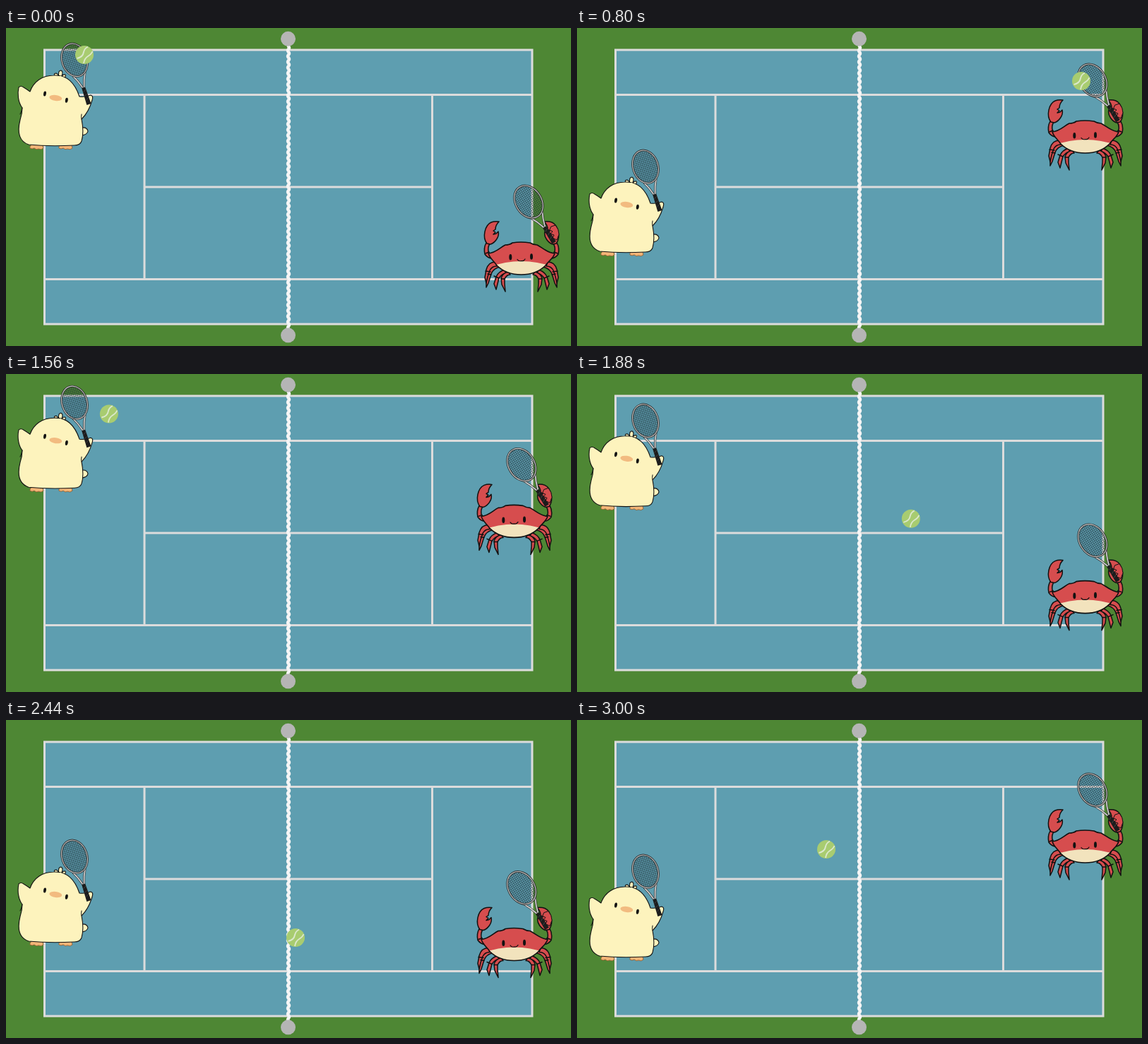
Animation of 800 by 450 pixels, one loop 3.04 s. Source, as an HTML page:

```html
<!DOCTYPE html>
<html lang="en">
<head>
<meta charset="utf-8">
<title>Tennis rally</title>
<style>
  html, body { margin: 0; width: 100%; height: 100%; overflow: hidden; background: #4e8734; }
  svg { display: block; width: 800px; height: 450px; }
  .ink { stroke: #111; stroke-linecap: round; stroke-linejoin: round; }
</style>
</head>
<body>
<svg viewBox="0 0 800 450">
  <defs>
    <clipPath id="head"><ellipse rx="18" ry="24"/></clipPath>
    <path id="shell" d="M683 319C694 318 699 311 707 307Q713 307 717 304Q729 302 742 304Q747 307 752 307C760 311 766 318 777 319C775 326 768 330 764 336C755 345 743 349 729.500 349C716 349 704 345 695 336C691 330 685 326 683 319Z"/>
    <clipPath id="shellClip"><use href="#shell"/></clipPath>

    <g id="racket">
      <path id="strings" clip-path="url(#head)" stroke="#23343b" stroke-width=".7" opacity=".75"/>
      <g fill="none">
        <path d="M-9 21Q-4 30-1 41M9 21Q4 30 1 41" stroke="#333" stroke-width="3"/>
        <path d="M-9 21Q-4 30-1 41M9 21Q4 30 1 41" stroke="#d5d5d5" stroke-width="1.600"/>
        <ellipse rx="17.800" ry="23.800" stroke="#2b2b2b" stroke-width="2.800"/>
        <ellipse rx="17.800" ry="23.800" stroke="#c9c9c9" stroke-width="1.100"/>
      </g>
      <path d="M-2.600 41H2.600L3.200 66H-3.200Z" fill="#1c1c1c"/>
      <path d="M-2 47L2 45M-2 53L2 51M-2 59L2 57" stroke="#4a4a4a" stroke-width=".7"/>
    </g>

    <g id="side" class="ink" fill="#d64d4e" stroke-width="1.500">
      <path d="M700 338Q690 340 687 348L683 361L680 367L680 358L682 346Q688 334 698 334Z"/>
      <path d="M693 331Q683 331 680 342L678 353L680 361L682 352L685 343Q688 337 695 337Z"/>
      <path d="M706 342Q697 345 694 352L691 362L694 370L696 362L698 354Q702 348 708 347Z"/>
      <path d="M711 345Q703 347 701 354L702 363L707 373L706 362L706 355Q709 349 714 349Z"/>
      <path d="M679 344L686 345M691 351L698 354M701 355L706 355M682 348L687 349" fill="none"/>
      <path d="M680 304Q676 311 678 320Q682 326 689 326L689 321Q684 320 683 316Q682 310 685 305Z"/>
      <path d="M679 319L684 317" fill="none"/>
      <path d="M681 305C674 296 678 279 687 275Q692 273 698 274Q693 279 693 285L690 287L693 289L690 292L694 291L697 288C699 296 692 304 686 306Z"/>
    </g>
  </defs>

  <path fill="#4e8734" d="M0 0H800V450H0Z"/>
  <path fill="#5e9eb0" stroke="#dcdcdc" stroke-width="3" d="M54.500 31H745V419H54.500ZM54.500 94.500H745M54.500 355.500H745M196 94.500V355.500M603.500 94.500V355.500M196 225H603.500"/>
  <path id="net" fill="none" stroke="#f5f5f5" stroke-width="4.500" stroke-linecap="round"/>
  <g fill="#b5b5b5"><circle cx="399.500" cy="15.300" r="10.500"/><circle cx="399.500" cy="434.800" r="10.500"/></g>

  <g id="chick">
    <g class="ink" stroke-width="1.100">
      <g fill="#f3b577" stroke="#8b5a2b" stroke-width=".8">
        <path id="foot" d="M37 164Q33 168 34 170Q37 172 40 170Q43 173 46 171Q50 173 53 170Q53 167 50 164Z"/>
        <use href="#foot" x="41"/>
      </g>
      <path fill="#fdf3bd" d="M107 141Q115 140 116 146Q115 151 107 152Z"/>
      <path fill="#fdf3bd" d="M70 72Q66 64 71 64Q74 65 75 70Q73 60 78 60Q82 62 78 70Q80 65 84 66Q86 69 79 74Z"/>
      <path fill="#fdf3bd" d="M34 90C39 76 51 67 68 67C87 66 98 79 104 97Q112 98 120 95Q124 96 122 102C119 113 114 122 107 129C109 139 110 150 107 160Q105 166 97 166Q61 168 32 165C18 160 16 146 20 130Q23 121 23 113C17 105 16 93 18 84Q21 81 25 84Q30 87 34 90Z"/>
    </g>
    <path fill="#fdf3bd" d="M70.500 68H78.500L79 73H72Z"/>
    <path d="M23 113Q22 118 20 122M107 129Q106 126 107 122" class="ink" fill="none"/>
    <ellipse cx="70.300" cy="99" rx="9" ry="4" fill="#f2bb80" transform="rotate(8 70.300 99)"/>
    <ellipse cx="55" cy="93" rx="1.900" ry="3.500" fill="#111" transform="rotate(9 55 93)"/>
    <ellipse cx="85.800" cy="102.300" rx="1.900" ry="3.500" fill="#111" transform="rotate(9 85.800 102.300)"/>
    <use href="#racket" transform="translate(97 45.300) rotate(-18)"/>
  </g>

  <g id="crab">
    <use href="#side"/>
    <use href="#side" transform="matrix(-1 0 0 1 1460 0)"/>
    <use href="#shell" fill="#d64d4e"/>
    <path clip-path="url(#shellClip)" fill="#f2e3bd" d="M680 337Q696 335 707 332Q730 328 752 332Q764 335 780 337V352H680Z"/>
    <use href="#shell" class="ink" fill="none" stroke-width="1.600"/>
    <g fill="#111"><ellipse cx="714.300" cy="324.300" rx="2" ry="4.300"/><ellipse cx="744" cy="323.500" rx="2" ry="4.300"/></g>
    <path d="M724 327.500Q726 330.500 729.500 329.500Q733 330.500 735 327" class="ink" fill="none" stroke-width="1.200"/>
    <use href="#racket" transform="translate(740 246) rotate(-32) scale(1.030)"/>
    <path class="ink" fill="#d64d4e" stroke-width="1" d="M770 286L774 288L771 291L776 293L774 297L780 300L783 292Q783 285 778 279L772 281Z"/>
  </g>

  <g id="ball">
    <circle r="13" fill="#a8cc70"/>
    <path d="M-10.500 5Q-2 3-1 -4Q0-9 5-11.500M-1 12Q0 5 5 2Q10-1 11.500-5" fill="none" stroke="#dbe8cd" stroke-width="1.900"/>
  </g>
</svg>
<script>
const $ = id => document.getElementById(id);

// Steps at which the ball is struck, then the last step of the loop
const keys = [0, 19, 36, 51, 67, 72];
const tracks = {
  ball:  { x: [111, 714, 105, 718, 102, 353], y: [38, 75, 38, 316, 300, 183] },
  chick: { x: [0, 0, 0, 0, 0, 0], y: [0, 151, -8, 40, 256, 169] },
  crab:  { x: [0, -10, -10, -10, -10, -10], y: [0, -172, -131, 70, -87, -147] }
};
const LOOP = 3040, TICK = 40;

let grid = '';
for (let p = -24; p <= 24; p += 2.6) grid += `M${p} -25V25M-20 ${p}H20`;
$('strings').setAttribute('d', grid);

let rope = 'M400 26';
for (let y = 26; y < 424; y += 8) rope += `q1.800 2 0 4q-1.800 2 0 4`;
$('net').setAttribute('d', rope);

function at(values, step) {
  let k = 0;
  while (k < keys.length - 2 && step >= keys[k + 1]) k++;
  const part = (step - keys[k]) / (keys[k + 1] - keys[k]);
  return values[k] + (values[k + 1] - values[k]) * part;
}

function draw(ms) {
  const slot = Math.floor((ms % LOOP) / TICK);
  // 24 steps per second shown on a 25 per second clock
  const step = slot - Math.floor((slot + 13) / 25);
  for (const id in tracks) {
    const { x, y } = tracks[id];
    $(id).setAttribute('transform', `translate(${at(x, step)} ${at(y, step)})`);
  }
}

const start = performance.now();
function loop() {
  draw(performance.now() - start);
  requestAnimationFrame(loop);
}
loop();
</script>
</body>
</html>
```
